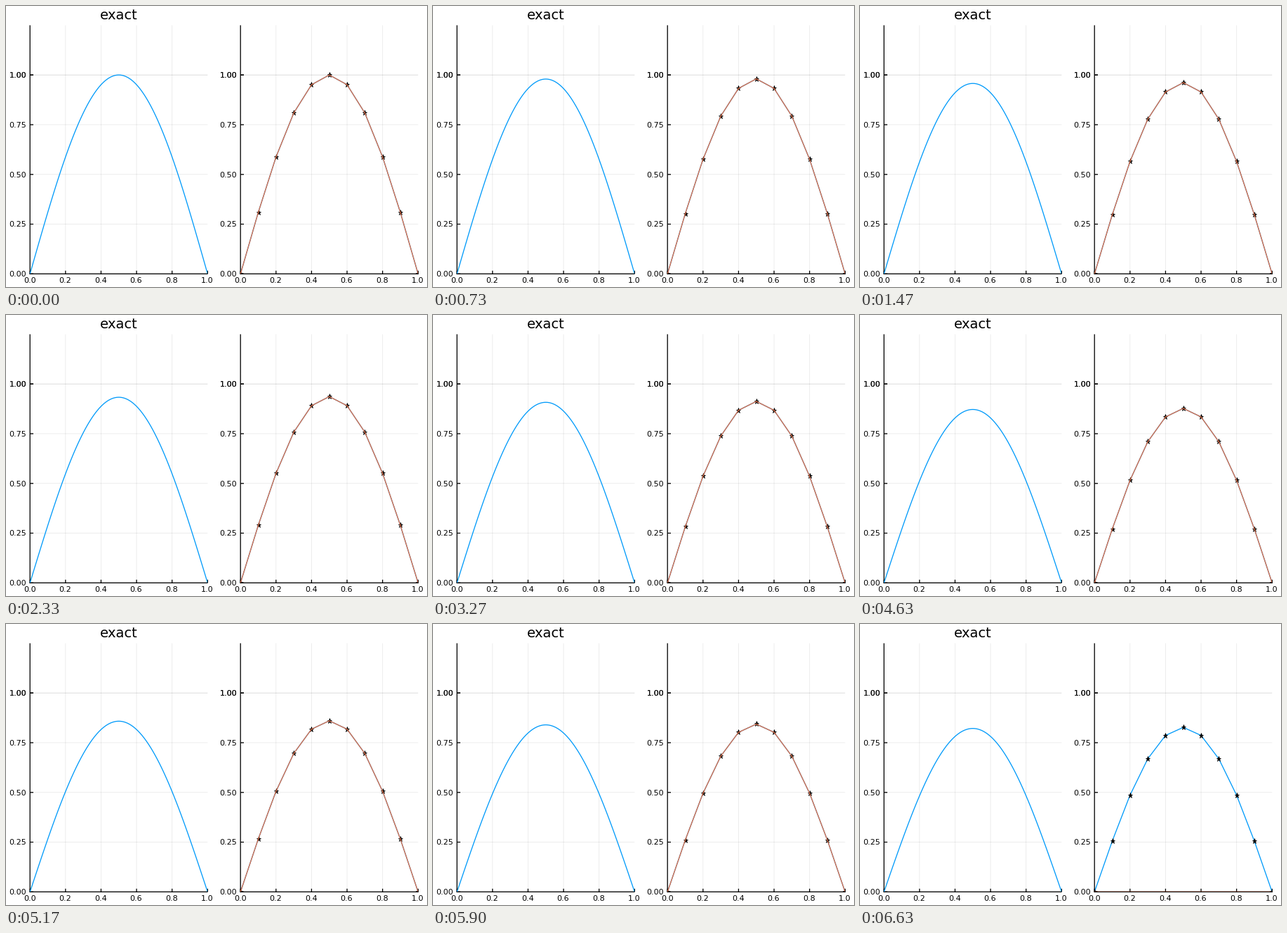
These frames come from a looping animation (600x400 px, 6660 ms). A matplotlib script:

```python
import matplotlib.pyplot as plt
import numpy as np
from matplotlib.animation import FuncAnimation
from matplotlib.patches import Rectangle

W, H, DPI = 600, 400, 100
FRAMES, LOOP_MS = 200, 6660
PX = 72 / DPI
BLUE, ORANGE = "#009AFA", "#E36F47"
TOP, BOTTOM, PANEL_W = 27.4, 381.3, 253.1
Y_MAX = 1.25

# heat equation u_t = u_xx on [0, 1], solved in 30 explicit steps
T_END, STEPS, CELLS = 0.02, 30, 10
R = T_END / STEPS * CELLS ** 2
DECAY = 1 - 2 * R * (1 - np.cos(np.pi / CELLS))

plt.rcParams["font.family"] = "DejaVu Sans"
plt.rcParams["text.kerning_factor"] = 6
fig = plt.figure(figsize=(W / DPI, H / DPI), dpi=DPI, facecolor="white")
ax = fig.add_axes([0, 0, 1, 1])
ax.set(xlim=(0, W), ylim=(H, 0))
ax.axis("off")


def to_y(v):
    return BOTTOM - np.asarray(v) / Y_MAX * (BOTTOM - TOP)


def rule(xs, ys, width=1.3, alpha=1.0, z=2):
    ax.plot(xs, ys, color="black", lw=width * PX, alpha=alpha, zorder=z,
            snap=False, solid_capstyle="butt")


def label(x, y, text, size=8, ha="center"):
    ax.text(x, y, text, fontsize=size, ha=ha, va="baseline", color="black")


class Panel:
    def __init__(self, left):
        self.left, self.right = left, left + PANEL_W
        self.clip = Rectangle((left, TOP), PANEL_W, BOTTOM - TOP,
                              transform=ax.transData)
        for v in np.linspace(0, 1, 6):
            x = self.to_x(v)
            if 0 < v < 1:
                rule([x, x], [TOP, BOTTOM], 0.8, 0.09, 1)
            rule([x, x], [BOTTOM, BOTTOM - 4.5])
            label(x - 0.6, 394, f"{v:.1f}")
        # the tick at 1 is drawn twice
        for v in (0, 0.25, 0.5, 0.75, 1, 1):
            y = float(to_y(v))
            rule([left, self.right], [y, y], 0.8, 0.09, 1)
            rule([left, left + 4.8], [y, y])
            label(left - 5.2, y + 3.9, f"{v:.2f}", ha="right")
        rule([left, left], [TOP, BOTTOM + 0.6])
        rule([left - 0.6, self.right], [BOTTOM, BOTTOM])

    def to_x(self, v):
        return self.left + np.asarray(v) * PANEL_W

    def curve(self, x, color, z, **style):
        line, = ax.plot(self.to_x(x), to_y(0 * x), color=color, zorder=z,
                        lw=1.3 * PX, snap=False, **style)
        line.set_clip_path(self.clip)
        return line


exact, coarse = Panel(34.2), Panel(334.2)
label(160.5, 19.3, "exact", 14)

x_fine = np.linspace(0, 1, 101)
x_grid = np.linspace(0, 1, CELLS + 1)
smooth = exact.curve(x_fine, BLUE, 3)
first = coarse.curve(x_grid, BLUE, 3)
stars = coarse.curve(x_grid, "black", 4, linestyle="none", marker="*",
                     markersize=7.2 * PX, markeredgewidth=0.8 * PX)
second = coarse.curve(x_grid, ORANGE, 5)


def draw(i):
    t = T_END * i / FRAMES
    smooth.set_ydata(to_y(np.exp(-np.pi ** 2 * t) * np.sin(np.pi * x_fine)))
    step = i * STEPS // FRAMES
    u = DECAY ** step * np.sin(np.pi * x_grid)
    first.set_ydata(to_y(u))
    stars.set_ydata(to_y(u))
    # the second solution has no values at the last step
    second.set_ydata(to_y(u if step < STEPS - 1 else 0 * u))
    return smooth, first, stars, second


anim = FuncAnimation(fig, draw, frames=FRAMES, interval=LOOP_MS / FRAMES,
                     repeat=True, repeat_delay=0)
plt.show()
```
